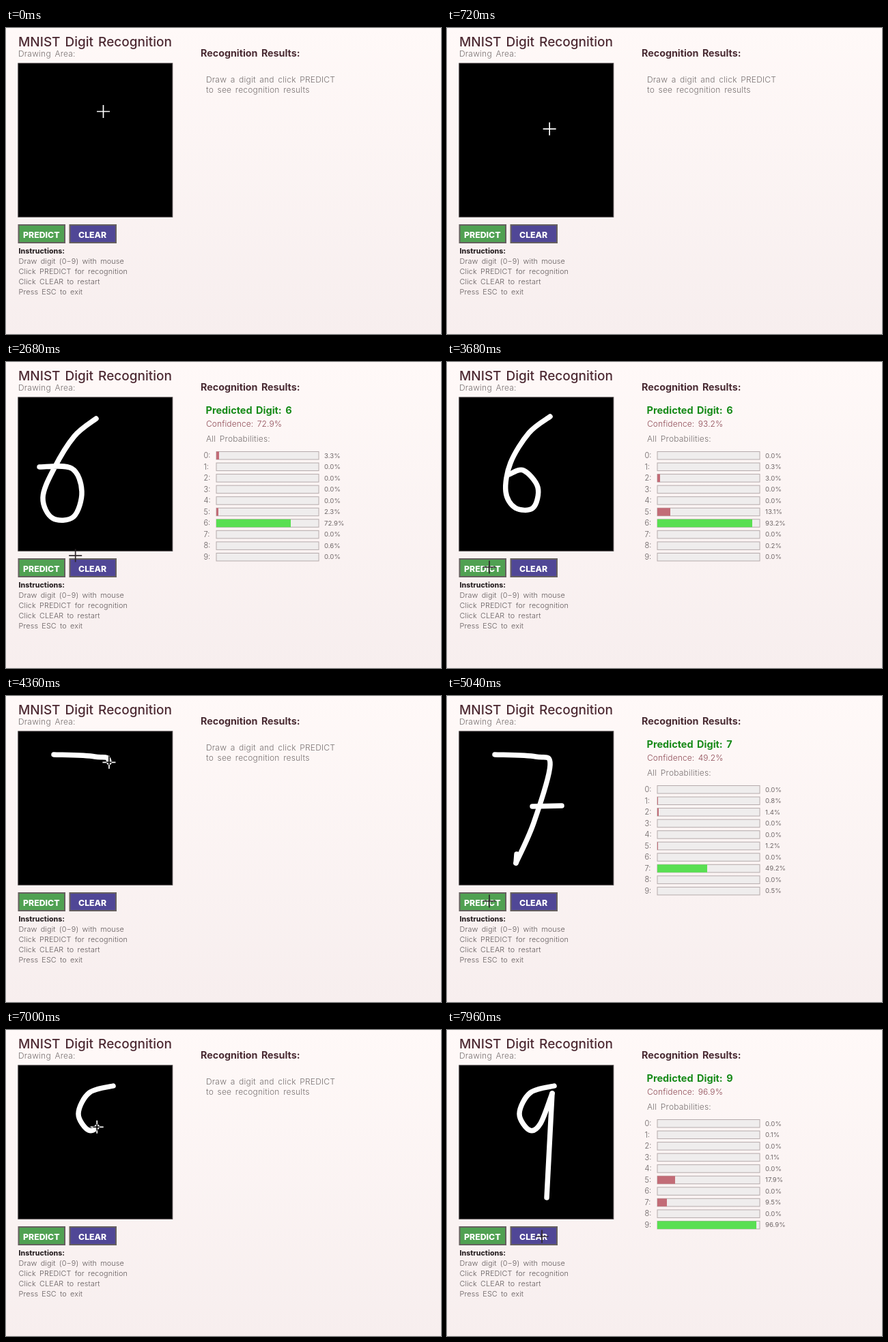
Write an HTML page that moves like this. It is 637x449 px and loops after 8000 ms.

```html
<!DOCTYPE html>
<html lang="en">
<head>
<meta charset="utf-8">
<title>MNIST Digit Recognition</title>
<style>
  html, body { margin: 0; width: 100%; height: 100%; overflow: hidden; background: #fbf3f3; }
  svg { display: block; width: 637px; height: 449px; font-family: Inter, Roboto, sans-serif; word-spacing: 2px; }
  .title { font-size: 19px; font-weight: 500; fill: #4d2a33; }
  .head { font-size: 14.3px; font-weight: 700; fill: #4a2c34; }
  .note { font-size: 12px; font-weight: 300; fill: #777070; letter-spacing: .2px; }
  .bold { font-size: 10.6px; font-weight: 800; fill: #2c2527; }
  .help { font-size: 10.8px; font-weight: 300; fill: #625b5c; letter-spacing: .15px; }
  .button { font-size: 12.3px; font-weight: 800; fill: #fff; }
  .digit { font-size: 14.5px; font-weight: 700; fill: #168a18; }
  .confidence { font-size: 12px; font-weight: 300; fill: #8d4954; letter-spacing: .1px; }
  .label { font-size: 11px; font-weight: 300; fill: #625b5c; }
  .percent { font-size: 9.6px; fill: #706869; }
  .ink { fill: none; stroke: #fff; stroke-width: 7.5; stroke-linecap: round; stroke-linejoin: round; }
</style>
</head>
<body>
<svg id="stage" viewBox="0 0 637 449">
  <defs>
    <linearGradient id="paper" x2="0" y2="1">
      <stop stop-color="#fff9f8"/><stop offset="1" stop-color="#f7eeee"/>
    </linearGradient>
  </defs>
  <rect width="637" height="449" fill="url(#paper)"/>
</svg>
<script>
// Every trial repeats one cycle: draw, press PREDICT, read, press CLEAR.
const LOOP = 8000, FIRST = 1600, CYCLE = 1300;
const DRAWN = 560, SHOWN = 740, LEAVE = 880, ARRIVE = 1160, CLEARED = 1200;
const PREDICT = [62, 301], CLEAR = [139, 303];
const IDLE_FROM = [142.5, 122.5], IDLE_TO = [156.5, 169.5], IDLE_END = 1360;

// Strokes are key points, joined by a smooth curve.
const trials = [
  { digit: 6, scores: { 0: 3.3, 5: 2.3, 6: 72.9, 8: 0.6 },
    strokes: ['132,83 100,109 70,157 54,199 68,229 99,227 111,190 96,156 49,154'] },
  { digit: 6, scores: { 1: 0.3, 2: 3, 5: 13.1, 6: 93.2, 8: 0.2 },
    strokes: ['151,80 120,104 93,148 86,190 100,214 126,214 133,184 112,159 91,165'] },
  { digit: 7, scores: { 1: 0.8, 2: 1.4, 5: 1.2, 7: 49.2, 9: 0.5 },
    strokes: ['70,86 130,89 151,101 127,186 101,245', '101,245 102,232', '125,162 168,161'] },
  { digit: 8, scores: { 3: 2.4, 5: 6.2, 8: 88.4 },
    strokes: ['150,92 108,112 150,190 124,228 101,200 150,92'] },
  { digit: 9, scores: { 1: 0.1, 3: 0.1, 5: 17.9, 7: 9.5, 9: 96.9 },
    strokes: ['157,82 122,92 106,123 121,147 137,137 154,93', '154,93 146,246'] }
];

const stage = document.getElementById('stage');
const clamp = u => Math.min(1, Math.max(0, u));
const smooth = u => u * u * (3 - 2 * u);
const progress = (time, start, end) => clamp((time - start) / (end - start));
const show = (node, visible) => node.style.display = visible ? '' : 'none';

function add(parent, tag, attrs, content = '') {
  const node = document.createElementNS('http://www.w3.org/2000/svg', tag);
  for (const name in attrs) node.setAttribute(name, attrs[name]);
  node.textContent = content;
  parent.append(node);
  return node;
}
const text = (parent, cls, x, y, content) => add(parent, 'text', { class: cls, x, y }, content);
const box = (parent, x, y, width, height, fill, stroke = 'none', weight = 1) =>
  add(parent, 'rect', { x, y, width, height, fill, stroke, 'stroke-width': weight });

function button(x, textX, label, fill) {
  box(stage, x, 289, 67.5, 26, fill, '#66605f', 2);
  text(stage, 'button', textX, 307.5, label);
}

// Catmull-Rom spline as cubic Béziers.
function curve(points) {
  const p = points.split(' ').map(pair => pair.split(',').map(Number));
  const handle = (at, from, to) => at.map((v, k) => v + (to[k] - from[k]) / 6);
  return `M${p[0]}` + p.slice(1).map((end, i) => {
    const start = p[i], before = p[i - 1] || start, after = p[i + 2] || end;
    return `C${handle(start, before, end)} ${handle(end, after, start)} ${end}`;
  }).join('');
}

text(stage, 'title', 18, 27, 'MNIST Digit Recognition');
text(stage, 'note', 18, 42, 'Drawing Area:');
text(stage, 'head', 285, 42, 'Recognition Results:');
box(stage, 17.8, 51.8, 226, 225.5, '#000', '#4a4546');
button(18.5, 25, 'PREDICT', '#50a152');
button(93.5, 106, 'CLEAR', '#504796');
text(stage, 'bold', 18.5, 331, 'Instructions:');
['Draw digit (0−9) with mouse', 'Click PREDICT for recognition', 'Click CLEAR to restart', 'Press ESC to exit']
  .forEach((line, i) => text(stage, 'help', 18.5, 346 + 15 * i, line));

const hint = add(stage, 'g');
['Draw a digit and click PREDICT', 'to see recognition results']
  .forEach((line, i) => text(hint, 'note', 293, 79.5 + 15 * i, line));

function buildResult({ digit, scores }) {
  const group = add(stage, 'g');
  text(group, 'digit', 292.5, 75.5, `Predicted Digit: ${digit}`);
  text(group, 'confidence', 293, 94.5, `Confidence: ${scores[digit].toFixed(1)}%`);
  text(group, 'note', 293, 117, 'All Probabilities:');
  for (let i = 0; i < 10; i++) {
    const y = 131.5 + 16.55 * i, score = scores[i] || 0;
    text(group, 'label', 289.5, y + 9.5, `${i}:`);
    box(group, 308, y, 150, 11.5, '#efeded', '#b5abac');
    box(group, 308, y, Math.floor(score * 1.5), 11.5, i === digit ? '#59df52' : '#c26c77');
    text(group, 'percent', 466, y + 9, `${score.toFixed(1)}%`);
  }
  return group;
}

trials.forEach((trial, i) => {
  trial.start = FIRST + CYCLE * i;
  trial.result = buildResult(trial);
  trial.length = 0;
  trial.strokes = trial.strokes.map(points => {
    const path = add(stage, 'path', { class: 'ink', d: curve(points) });
    const length = path.getTotalLength(), offset = trial.length;
    path.setAttribute('stroke-dasharray', `${length} ${length + 20}`);
    trial.length += length;
    return { path, length, offset };
  });
});
const cursor = add(stage, 'path', { d: 'M-9.5 0H9.5M0-9.5V9.5', 'stroke-width': 1.7 });

function penAt({ strokes, length }, u) {
  const drawn = u * length;
  const { path, offset } = strokes.findLast(s => s.offset <= drawn);
  const { x, y } = path.getPointAtLength(drawn - offset);
  return [x, y];
}

function glide([x0, y0], [x1, y1], u, lift = 0) {
  return [x0 + (x1 - x0) * u, y0 + (y1 - y0) * u - lift * Math.sin(Math.PI * u)];
}

function cursorAt(time) {
  if (time < IDLE_END) return glide(IDLE_FROM, IDLE_TO, smooth(time / IDLE_END));
  if (time < FIRST) return glide(IDLE_TO, penAt(trials[0], 0), smooth(progress(time, IDLE_END, FIRST)));
  const index = Math.floor((time - FIRST) / CYCLE), trial = trials[index];
  const age = time - trial.start;
  if (age < DRAWN) return penAt(trial, age / DRAWN);
  if (age < LEAVE) return glide(penAt(trial, 1), PREDICT, smooth(progress(age, DRAWN, SHOWN)));
  if (age < CLEARED) return glide(PREDICT, CLEAR, progress(age, LEAVE, ARRIVE) ** 2, 18);
  return glide(CLEAR, penAt(trials[index + 1], 0), smooth(progress(age, CLEARED, CYCLE)));
}

function render(time) {
  let anyResult = false;
  for (const { start, result, strokes, length } of trials) {
    const age = time - start, drawn = clamp(age / DRAWN) * length;
    const visible = age >= SHOWN && age < CLEARED;
    anyResult ||= visible;
    show(result, visible);
    for (const stroke of strokes) {
      const inked = Math.min(stroke.length, drawn - stroke.offset);
      show(stroke.path, inked > 0 && age < CLEARED);
      stroke.path.setAttribute('stroke-dashoffset', stroke.length - Math.max(0, inked));
    }
  }
  show(hint, !anyResult);
  const [x, y] = cursorAt(time);
  const onBoard = x > 18 && x < 244 && y > 52 && y < 277;
  cursor.setAttribute('transform', `translate(${x} ${y})`);
  cursor.setAttribute('stroke', onBoard ? '#fff' : '#30282c');
  cursor.style.mixBlendMode = onBoard ? 'difference' : 'normal';
}

const origin = performance.now();
function tick() {
  render((performance.now() - origin) % LOOP);
  requestAnimationFrame(tick);
}
tick();
</script>
</body>
</html>
```
